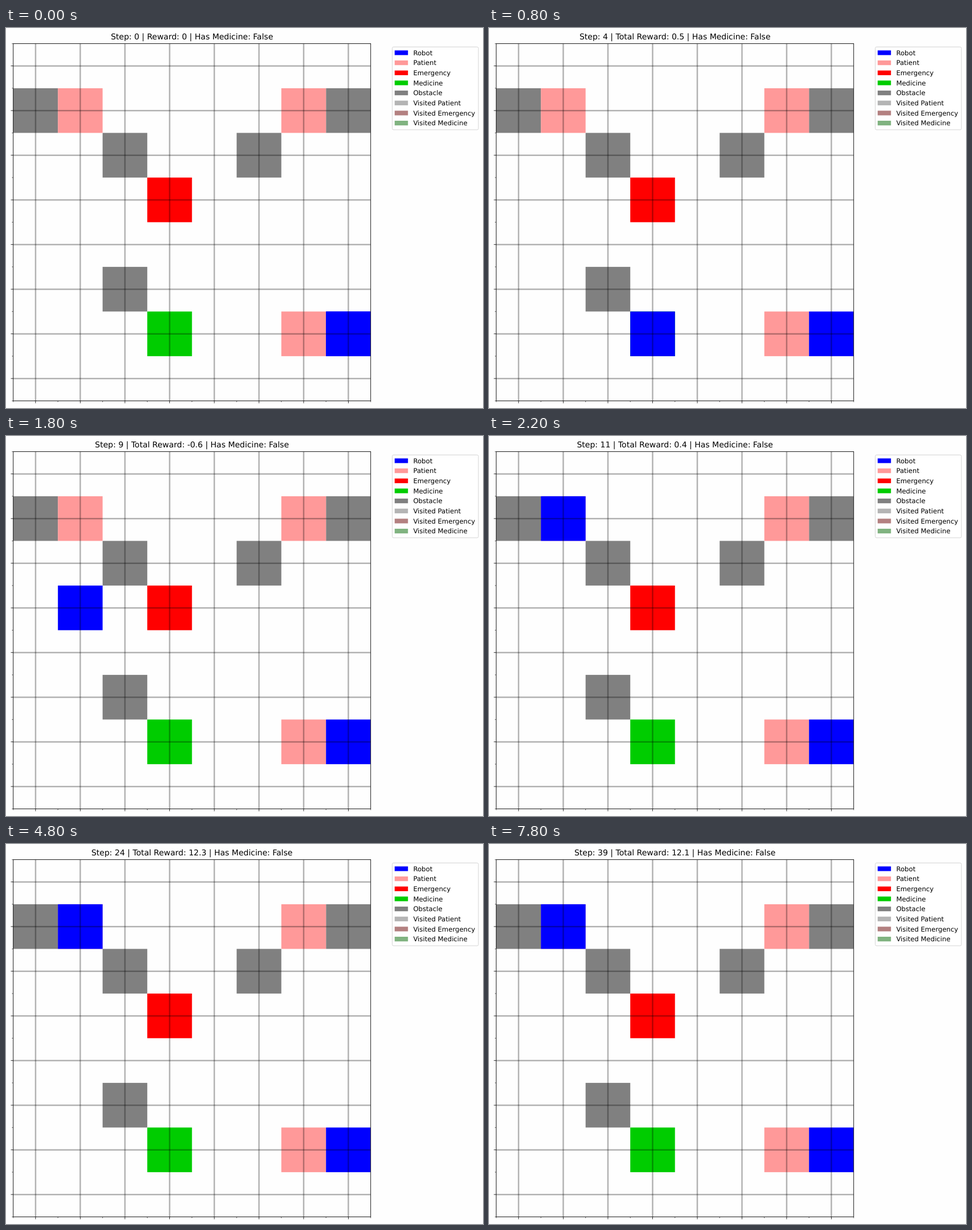
Animation, 838 px wide and 668 px high, one loop 8 s. Source, as an HTML page:

```html
<!DOCTYPE html>
<html lang="en">
<head>
<meta charset="utf-8">
<title>Grid robot</title>
<style>
  html, body { margin: 0; width: 100%; height: 100%; overflow: hidden; background: #fefefe; }
  svg { display: block; width: 838px; height: 668px; }
  text { font-family: "DejaVu Sans", sans-serif; font-size: 11.67px; text-rendering: geometricPrecision; }
  #title { font-size: 14px; text-anchor: middle; }
  .grid { stroke: #000; stroke-opacity: .3; stroke-width: 2.5; }
  .tick { stroke: #000; stroke-width: .84; }
  .minor { stroke: #000; stroke-width: .6; }
  .frame { fill: none; stroke: #000; stroke-width: .9; }
  .box { fill: #fff; fill-opacity: .8; stroke: #ccc; stroke-width: .84; }
</style>
</head>
<body>
<svg id="stage" viewBox="0 0 838 668">
  <text id="title" x="326.7" y="20.3"></text>
</svg>
<script>
const SIZE = 8, CELL = 78.5, LEFT = 12.7, TOP = 27.4, SPAN = SIZE * CELL;
const STEP_MS = 200, STEPS = 40;
const BLUE = '#00f', PINK = '#f99', RED = '#f00', GREEN = '#0c0', GRAY = '#808080';

const stage = document.getElementById('stage');
const title = document.getElementById('title');

function add(tag, attrs, text) {
  const el = document.createElementNS('http://www.w3.org/2000/svg', tag);
  for (const key in attrs) el.setAttribute(key, attrs[key]);
  if (text) el.textContent = text;
  return stage.appendChild(el);
}

const line = (cls, x1, y1, x2, y2) => add('line', { class: cls, x1, y1, x2, y2 });
const place = ([col, row]) => ({ x: LEFT + col * CELL, y: TOP + row * CELL });
const cell = (pos, fill) => add('rect', { ...place(pos), width: CELL, height: CELL, fill });

const start = [7, 6];
const obstacles = [[0, 1], [7, 1], [2, 2], [5, 2], [2, 5]];
const patients = [[1, 1], [6, 1], [6, 6]];
const emergency = [3, 3], medicine = [3, 6];
const targets = [...patients, emergency, medicine];

obstacles.forEach(p => cell(p, GRAY));
patients.forEach(p => cell(p, PINK));
cell(emergency, RED);
cell(medicine, GREEN);
cell(start, BLUE);
const robot = cell(start, BLUE);

const right = LEFT + SPAN, bottom = TOP + SPAN;
for (let i = 0; i < SIZE; i++) {
  const x = LEFT + (i + .5) * CELL, y = TOP + (i + .5) * CELL;
  line('grid', x, TOP, x, bottom);
  line('grid', LEFT, y, right, y);
  line('tick', x, bottom, x, bottom + 4.2);
  line('tick', LEFT - 4.2, y, LEFT, y);
}
for (let i = 0; i <= SIZE; i++) {
  const { x, y } = place([i, i]);
  line('minor', x, bottom, x, bottom + 2.4);
  line('minor', LEFT - 2.4, y, LEFT, y);
}
add('rect', { class: 'frame', x: LEFT, y: TOP, width: SPAN, height: SPAN });

add('rect', { class: 'box', x: 678.6, y: 33.3, width: 151.3, height: 145.6, rx: 2.3 });
[
  ['Robot', BLUE], ['Patient', PINK], ['Emergency', RED], ['Medicine', GREEN],
  ['Obstacle', GRAY], ['Visited Patient', '#b4b4b4'],
  ['Visited Emergency', '#b38080'], ['Visited Medicine', '#80b380'],
].forEach(([label, fill], i) => {
  const y = 43.4 + i * 17.66;
  add('rect', { x: 682.8, y: y - 4, width: 23.4, height: 8.2, fill });
  add('text', { x: 715.4, y: y + 4.3 }, label);
});

// Left six cells, up five, then wait on the patient.
const position = step => [7 - Math.min(step, 6), 6 - Math.min(Math.max(step - 6, 0), 5)];
const nearest = ([c, r]) => Math.min(...targets.map(([x, y]) => Math.abs(x - c) + Math.abs(y - r)));

// Each step costs a little; nearing a target earns, moving away loses, treatment pays once.
const totals = [0];
for (let step = 1; step < STEPS; step++) {
  const gain = nearest(position(step - 1)) - nearest(position(step));
  const treatment = step === 12 ? 12 : 0;
  totals[step] = totals[step - 1] + (-0.01 + Math.sign(gain) * 0.5 + treatment);
}

let shown = -1;
function draw(now) {
  const step = Math.floor(now / STEP_MS) % STEPS;
  if (step !== shown) {
    shown = step;
    const { x, y } = place(position(step));
    robot.setAttribute('x', x);
    robot.setAttribute('y', y);
    const reward = step ? `Total Reward: ${totals[step].toFixed(1)}` : 'Reward: 0';
    title.textContent = `Step: ${step} | ${reward} | Has Medicine: False`;
  }
  requestAnimationFrame(draw);
}
draw(performance.now());
</script>
</body>
</html>
```
